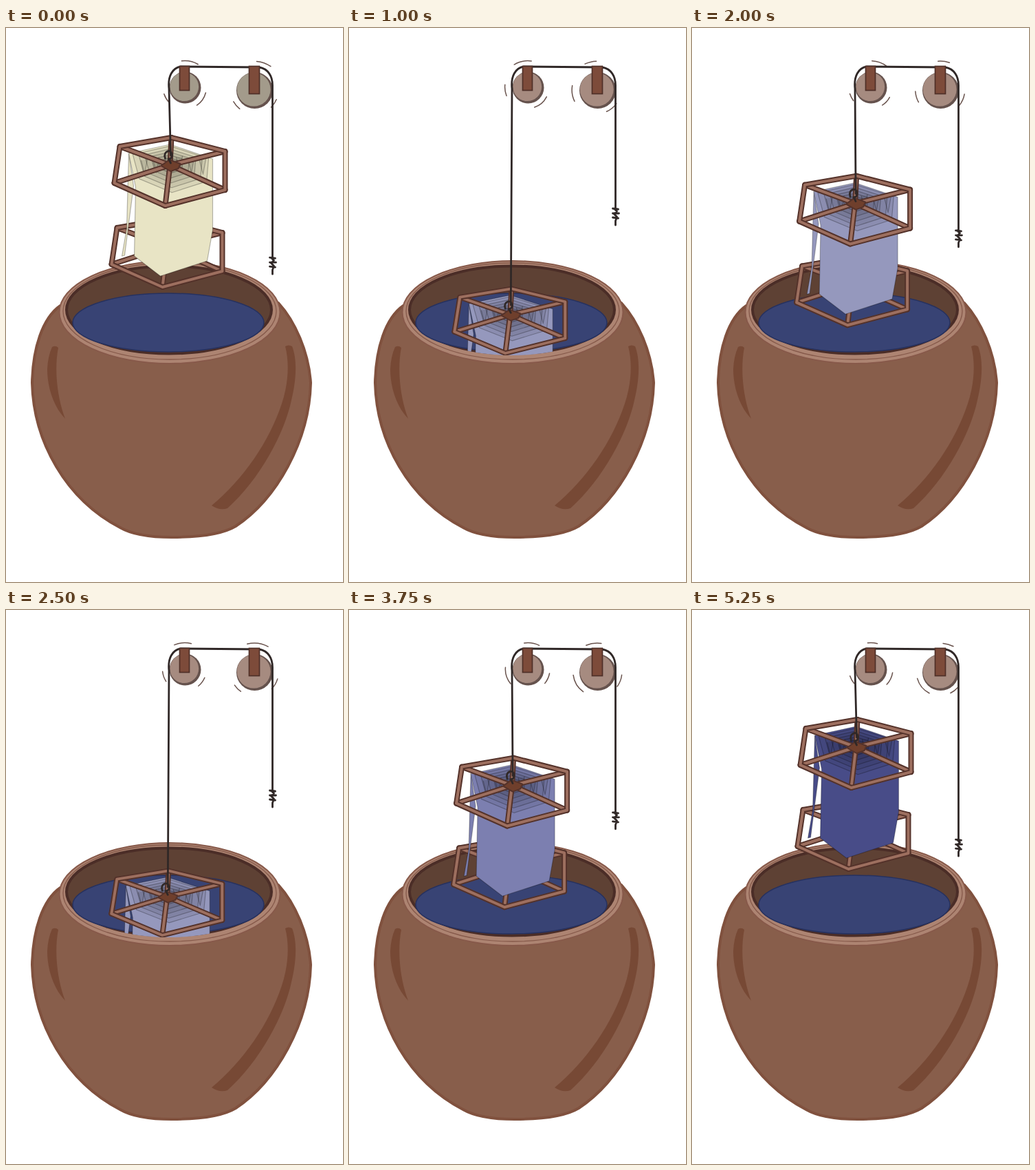
Recreate the animation shown at these times as an HTML page. Size 490x804 px, loop 5500 ms.

```html
<!DOCTYPE html>
<html lang="en">
<head>
<meta charset="utf-8">
<title>Dye vat</title>
<style>
html, body { margin: 0; width: 100%; height: 100%; overflow: hidden; background: #fff; }
svg { display: block; width: 100%; height: 100%; }
path, polygon { stroke-linejoin: round; stroke-linecap: round; }
.edge { fill: none; stroke: #54322a; stroke-width: 8; }
.wood { fill: none; stroke: #9d6f5f; stroke-width: 4; }
.rope { fill: none; stroke: #302827; stroke-width: 2.8; }
.mark { fill: none; stroke: #69534d; stroke-width: 1.5; }
.shine { fill: #774935; }
.bracket { fill: #7d4b3a; stroke: #4f3028; stroke-width: 1.7; }
#cloth { stroke: #000; stroke-opacity: .27; stroke-width: 1.2; }
#folds { fill: #000; fill-opacity: .07; }
</style>
</head>
<body>
<svg viewBox="0 0 490 804" preserveAspectRatio="none">
  <clipPath id="inside"><path d="M0 0H490V409H387A150 66 0 0 1 87 409H0Z"/></clipPath>

  <!-- pot -->
  <path fill="#885e4b" stroke="#80513e" stroke-width="4" d="M79 403C53 421 39 465 38 515C40 600 87 684 166 725C185 736 215 739 241 739C280 739 314 735 334 723C393 684 441 600 443 515C440 470 420 425 396 399"/>
  <path class="shine" d="M67 463Q72 460 76 464C70 495 74 535 86 567C68 548 60 520 60 495Q61 476 67 463Z"/>
  <path class="shine" d="M406 462Q411 459 416 462C423 480 423 507 415 540C405 588 369 655 322 697Q311 701 299 693C345 655 383 600 401 545C411 515 412 485 406 462Z"/>
  <ellipse cx="238" cy="412.5" rx="160.5" ry="74.5" fill="#ad8472" stroke="#87594a" stroke-width="2"/>
  <ellipse cx="238" cy="411" rx="155" ry="70" fill="none" stroke="#85594a" stroke-width="1.3"/>
  <ellipse cx="237" cy="409" rx="149" ry="63.5" fill="#5e4134" stroke="#4b2d27" stroke-width="4"/>
  <ellipse cx="236" cy="427.5" rx="139" ry="42.5" fill="#384374" stroke="#26315f" stroke-width="1.5"/>

  <!-- cage with cloth -->
  <g clip-path="url(#inside)"><g id="cage">
    <g id="lower" transform="translate(-4 118)"></g>
    <g id="cloth">
      <path d="M-60 -17L-63 92L-70 132L-66 131L-53 30Z"/>
      <path d="M-60 -17L0 -30L62 -9L62 94L54 139L-14 161L-52 132L-50 32Z"/>
      <g id="folds"></g>
    </g>
    <g id="upper"></g>
    <polygon points="-13,1 -1,-8 15,-2 12,5 1,9" fill="#6f3f2c" stroke="#54322a" stroke-width="2"/>
    <path class="rope" d="M-7 -10C-11 -20 2 -25 3 -15Q3 -9 -2 -9L1 -3"/>
  </g></g>

  <!-- pulleys -->
  <path id="marks" class="mark"/>
  <g id="discs"></g>
  <path id="rope" class="rope"/>
  <path id="knot" class="rope" d="M-4 -24L4 -23M-4 -17L5 -17M-4 -11L4 -10M-2 -24L2 -20L-2 -16L2 -12L0 -6V0"/>
  <rect class="bracket" x="252.5" y="55.5" width="14" height="35"/>
  <rect class="bracket" x="353.5" y="55.5" width="15" height="40"/>
</svg>
<script>
const STEP = 250, STEPS = 22, DIP = 7;
const $ = id => document.getElementById(id);

function add(parent, tag, attrs) {
  const el = document.createElementNS('http://www.w3.org/2000/svg', tag);
  for (const key in attrs) el.setAttribute(key, attrs[key]);
  parent.append(el);
  return el;
}

// Hexagonal wooden frame around a hub at 0,0
const hexagon = [[2, -40], [80, -20], [80, 36], [-7, 59], [-81, 26], [-73, -27]];
for (const id of ['lower', 'upper']) {
  const spokes = hexagon.map(p => `M0 0L${p}`).join('');
  for (const d of [spokes, `M${hexagon.join('L')}Z`])
    for (const cls of ['edge', 'wood']) add($(id), 'path', { class: cls, d });
}

// Cloth wound in a spiral, seen from above
const layer = [[-57, -14], [0, -27], [59, -8], [56, 27], [3, 44], [-47, 23]];
for (let k = 0.95; k > 0.3; k -= 0.16)
  add($('folds'), 'polygon', { points: layer.map(([x, y]) => [x * k, y * k - 2]).join(' ') });
for (let x = -42; x < 50; x += 17)
  add($('folds'), 'path', { d: `M${x} ${-12 + Math.abs(x) / 8}l5 20l4 -22` });

const pulleys = [{ x: 260, y: 86, r: 22.5 }, { x: 361, y: 90, r: 26 }];
const discs = pulleys.map(({ x, y, r }) => {
  add($('discs'), 'circle', { cx: x + 0.5, cy: y + 0.5, r: r + 0.5, fill: '#65524d' });
  return add($('discs'), 'circle', { cx: x - 0.8, cy: y - 0.8, r: r - 1.6 });
});

// Repeatable value from 0 to 1
function random(seed) {
  const v = Math.sin(seed * 12.9898 + 4.1) * 43758.5453;
  return v - Math.floor(v);
}

// Three loose arcs around a pulley, wider above than below
function pulleyMarks({ x, y, r }, seed) {
  let d = '';
  for (let i = 0; i < 3; i++) {
    const mid = 40 + 115 * i + 40 * (random(seed + i) - 0.5);
    const half = 10 + 14 * random(seed + i + 500);
    const radius = r + 11.5 - 4.5 * Math.sin(mid * Math.PI / 180);
    const at = deg => {
      const a = deg * Math.PI / 180;
      return `${x + radius * Math.cos(a)} ${y + radius * Math.sin(a)}`;
    };
    d += `M${at(mid - half)}A${radius} ${radius} 0 0 1 ${at(mid + half)}`;
  }
  return d;
}

const clothColors = ['#e8e4c5', '#9598bd', '#7c7fb0', '#484c88'];

function draw(step) {
  const phase = step % DIP;
  const depth = Math.min(phase, DIP - phase);
  const lift = 3 - depth;
  const x = 238.5 - 1.4 * depth;
  const y = 199 + 53.5 * depth + 2.1 * depth ** 3;
  const end = 286 + 14 * lift + 0.12 * lift ** 5;
  const dips = Math.floor((step + 3) / DIP);

  $('cage').setAttribute('transform', `translate(${x} ${y}) scale(1 ${1 - 0.002 * depth ** 3})`);
  $('knot').setAttribute('transform', `translate(387.5 ${end})`);
  $('rope').setAttribute('d',
    `M${x + 1} ${y - 14}L237 88C235 70 242 58 254 56L368 57C381 59 388 70 387.5 85V${end - 22}`);
  $('cloth').setAttribute('fill', clothColors[dips]);
  discs.forEach(d => d.setAttribute('fill', dips ? '#a68b80' : '#a39b8b'));
  $('marks').setAttribute('d', pulleys.map((p, i) => pulleyMarks(p, step * 10 + i * 5)).join(''));
}

const start = performance.now();
let shown = -1;
function tick(now) {
  const step = Math.floor(Math.max(0, now - start) / STEP) % STEPS;
  if (step !== shown) draw(shown = step);
  requestAnimationFrame(tick);
}
tick(start);
</script>
</body>
</html>
```
